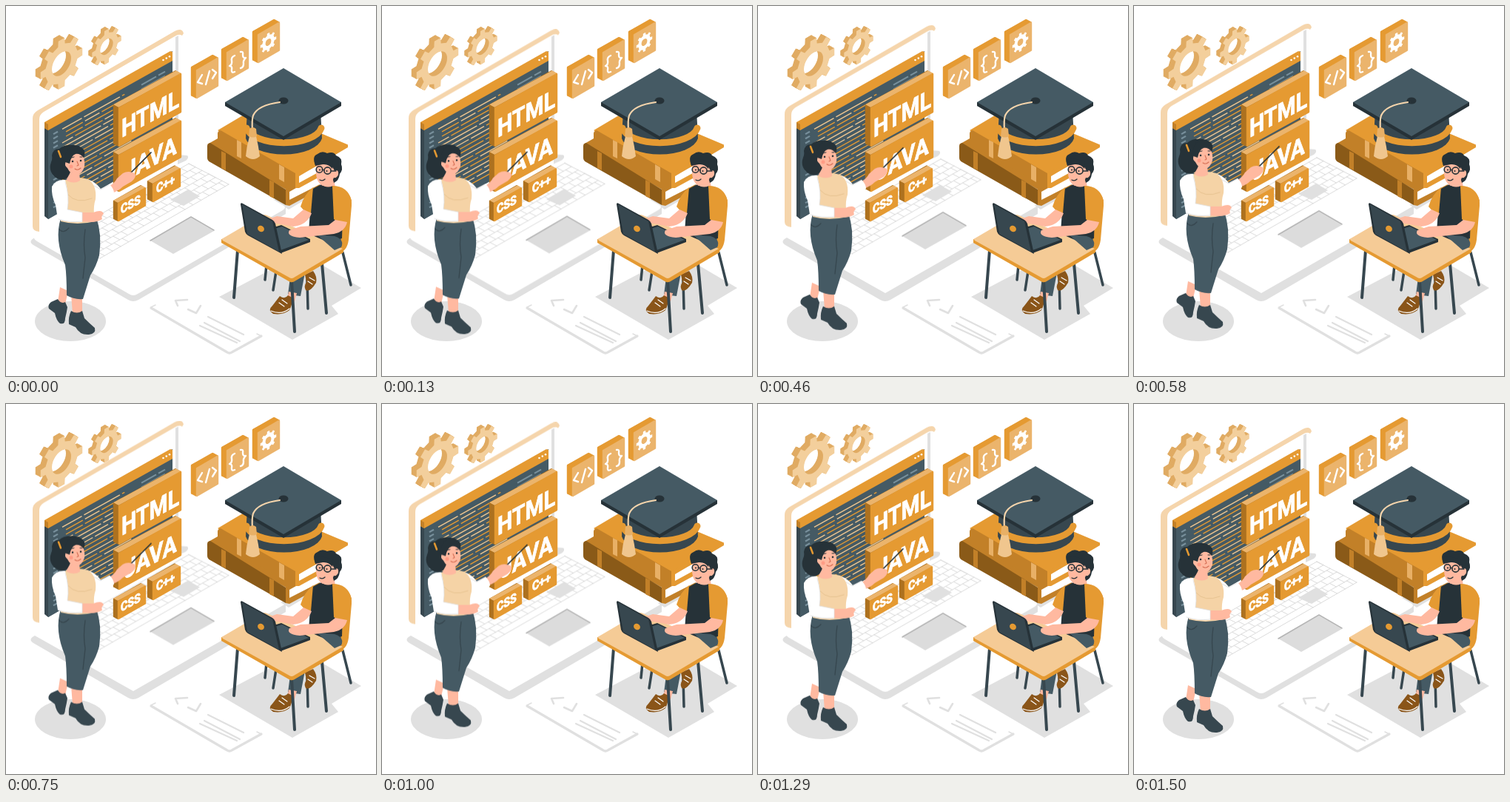
An HTML page that plays this animation: 500x500 px, repeating every 1540 ms.

```html
<!DOCTYPE html>
<html lang="en">
<head>
<meta charset="utf-8">
<title>Learning to code</title>
<style>
  html, body { margin: 0; width: 100%; height: 100%; overflow: hidden; background: #fff; }
  svg { display: block; width: 100%; height: 100%; }
  .float { animation: float 770ms cubic-bezier(.37, 0, .63, 1) infinite alternate; }
  @keyframes float { to { transform: translateY(-9.5px); } }
  text {
    font-family: Roboto, "Open Sans", sans-serif; font-weight: 700;
    fill: #fff; stroke: #fff; stroke-width: .9; stroke-linejoin: round;
  }
  .line { fill: none; stroke-linecap: round; stroke-linejoin: round; }
  .grey { fill: #e0e0e0; }
  .slate { fill: #455a64; }
  .dark { fill: #37474f; }
  .ink { fill: #263238; }
  .amber { fill: #e59a32; }
  .tan { fill: #c28028; }
  .brown { fill: #8a5a18; }
  .peach { fill: #f5d5ac; }
  .skin { fill: #ffb9a0; }
  .white { fill: #fff; }
</style>
</head>
<body>
<svg viewBox="0 0 500 500">
  <!-- floor shadows -->
  <path class="grey" d="M39 313Q29 318 37 323L165 397Q172 401 179 397L378 281V270L172 388Z"/>
  <ellipse class="grey" cx="87" cy="426" rx="48" ry="27"/>
  <path class="grey" d="M288 393L387 451L449 416L440 405L480 381L400 334Z"/>
  <path class="grey" d="M362 262L382 275L424 250L400 240Z"/>

  <!-- sheet of paper -->
  <g class="line" stroke="#e0e0e0">
    <path d="M196 408L299 468Q302 470 305 468L345 446" stroke-width="3.200"/>
    <path d="M196 407L202 404M339 443L345 446" stroke-width="1.500"/>
    <path d="M245 397L229 398L232 405M246 410L257 415L263 405" stroke-width="2.600"/>
    <path d="M273 420L321 444M268 428L316 453M262 432L312 455" stroke-width="2.200"/>
  </g>

  <!-- big laptop -->
  <g class="float">
    <path class="white" d="M42 309Q34 313 42 318L166 389Q172 393 178 389L374 276Q380 272 374 269L242 195Z"/>
    <path class="white" d="M40 302V150L234 36V202L70 306Z"/>
    <path class="grey" d="M229 42L233 40V205L229 206Z"/>
    <path class="grey" d="M232 201L245 202Q248 205 243 209L232 214Z"/>
    <path class="peach" d="M36 298V152Q36 145 43 141L228 34Q238 29 240 37L238 40Q234 37 228 41L51 143Q45 147 45 153V305Q36 304 36 298Z"/>
    <path class="line" id="keys" transform="matrix(1.74 -1 .54 .28 73 313)" stroke="#dcdcdc" stroke-width="1" vector-effect="non-scaling-stroke"/>
    <path class="grey" d="M222 262L246 248L262 257L240 270Z"/>
    <path fill="#dcdcdc" d="M195 317L250 286L281 304L226 335Z"/>
    <path class="line" d="M195 317L250 285L281 303" stroke="#b5b5b5" stroke-width="1.500"/>
  </g>

  <!-- code window -->
  <path class="dark" d="M52 158L225 61V191L57 288L52 284Z"/>
  <path class="slate" d="M57 161L225 66V191L57 288Z"/>
  <path class="amber" d="M52 157L222 61L225 62V74L57 168L52 165Z"/>
  <path class="tan" d="M52 157L57 160V168L52 165Z"/>
  <g class="white">
    <circle cx="212.500" cy="73" r="1.300"/><circle cx="216.800" cy="70.600" r="1.300"/><circle cx="221" cy="68.200" r="1.300"/>
  </g>
  <g id="code"></g>
  <g id="panels"></g>

  <g>
    <text transform="matrix(.84 -.455 0 1 156 178)" font-size="34">HTML</text>
    <text transform="matrix(.84 -.455 0 1 160 237)" font-size="34">JAVA</text>
    <text transform="matrix(.84 -.455 0 1 155 281)" font-size="17">CSS</text>
    <text transform="matrix(.84 -.455 0 1 203 253)" font-size="17">C++</text>
  </g>
  <g class="line" stroke="#fff" stroke-width="2.400">
    <path d="M265 93L259 103L265 105M270 106L275 88M279 86L284 90L279 98"/>
    <path d="M309 67Q304 69 305 74Q306 79 302 81Q306 81 305 86Q304 91 309 89M317 62Q321 61 320 66Q320 71 324 70Q320 74 321 78Q321 83 317 84"/>
  </g>
  <g id="gears"></g>

  <!-- books -->
  <path class="tan" d="M272 187L330 154L424 218L380 249Z"/>
  <path class="brown" d="M276 185Q271 186 272 192V205Q272 209 276 211L378 269V248Z"/>
  <path class="white" d="M381 249L424 228V246L384 264Z"/>
  <path class="tan" d="M378 248L424 222V228L383 251V262L424 241V248L383 270L378 269Z"/>
  <path class="amber" d="M286 168L340 136L461 187L462 190L391 230Z"/>
  <path class="tan" d="M290 168Q285 169 286 175V184Q286 188 290 190L391 246V226Z"/>
  <path class="white" d="M394 230L446 202V219L396 242Z"/>
  <path class="amber" d="M391 226L462 187V191L396 230V239L440 215V222L396 246L391 246Z"/>
  <g fill="#e8b066">
    <path d="M312 181L318 184V206L312 203ZM369 214L376 218V238L369 234Z"/>
    <path fill="#c28028" d="M291 196L297 199V222L291 219ZM356 235L362 238V260L356 257Z"/>
  </g>

  <!-- graduation cap -->
  <path class="dark" d="M326 140L324 179A52 25 0 0 0 427 179L425 140Z"/>
  <path class="line" d="M325 165A51 23 0 0 0 426 165" stroke="#e59a32" stroke-width="9" stroke-linecap="butt"/>
  <path class="ink" d="M296 130V135L375 181L453 135V130Z"/>
  <path class="slate" d="M296 130L375 84L453 130L375 176Z"/>
  <ellipse class="ink" cx="375" cy="128" rx="6.500" ry="4.500"/>
  <path class="line" d="M370 130Q340 134 334 148Q332 154 333 168" stroke="#f5d5ac" stroke-width="2.200"/>
  <path fill="#f0c68e" d="M329 176Q325 190 324 203Q334 211 343 203Q341 188 338 176Z"/>
  <path fill="#e8b066" d="M329 166Q333 162 338 166L339 176Q334 179 328 176Z"/>

  <!-- chair and lower body -->
  <g class="line" stroke="#37474f" stroke-width="3.500">
    <path d="M455 333L466 377M366 352L361 384M407 370L408 409M353 340L350 370"/>
  </g>
  <path class="amber" d="M452 248Q468 252 467 270L463 316Q461 331 450 334L426 340L436 312Z"/>
  <path class="slate" d="M416 306L452 312Q456 326 440 330L406 350L398 392L381 390L386 350Z"/>
  <path class="skin" d="M382 386L393 388L390 399L380 396Z"/>
  <path d="M370 392Q377 397 381 391L387 394Q387 404 383 411Q375 418 361 416Q353 411 360 405Z" fill="#8a5519"/>
  <path d="M404 363L415 358Q421 366 419 374Q411 387 405 384Q402 379 406 373Z" fill="#8a5519"/>
  <path class="line" d="M358 412Q372 418 383 409M369 401L376 406M373 397L380 402M410 367L417 371M408 372L414 376" stroke="#fff" stroke-width="1.200"/>

  <!-- man -->
  <path class="skin" d="M426 232L443 230L445 246Q433 253 425 245Z"/>
  <path class="ink" d="M413 248L426 241Q433 247 442 243L456 252L454 314Q430 322 409 306Z"/>
  <path class="amber" d="M415 245Q403 254 398 271Q404 279 412 280Z"/>
  <path class="amber" d="M441 243Q462 243 467 263L462 292Q450 294 443 288Z"/>
  <path class="ink" d="M418 215Q413 203 421 200Q427 195 434 199Q443 196 446 202Q455 205 453 214Q456 221 451 227Q450 236 443 239L436 214Z"/>
  <path class="skin" d="M419 213L439 215Q443 220 444 223Q450 220 449 228Q447 233 443 232Q440 243 428 243Q420 239 419 227Z"/>
  <path class="ink" d="M418 216Q415 205 426 206L442 210L441 220Q436 213 428 214Z"/>
  <g class="line" stroke="#263238" stroke-width="1.600">
    <circle cx="423.500" cy="221" r="4.300"/><circle cx="434.500" cy="222.500" r="4.600"/>
    <path d="M427 221L430 222M439 223L446 223M424 235Q428 237 431 234" stroke-width="1.300"/>
  </g>
  <circle class="ink" cx="424" cy="221.500" r="1.100"/><circle class="ink" cx="433.500" cy="223" r="1.100"/>

  <!-- desk -->
  <g class="line" stroke="#37474f" stroke-width="4">
    <path d="M313 330L308 394M386 372L390 440M427 348L433 415"/>
  </g>
  <path class="amber" d="M291 315V320L384 373Q387 374 390 372L456 333V328Z"/>
  <path fill="#f5cb96" d="M293 314L346 283Q349 281 353 283L455 328L389 367Q386 369 383 367L293 317Q290 315 293 314Z"/>
  <path class="slate" d="M420 309L444 311Q458 316 453 326L444 330Z"/>

  <!-- small laptop and hands -->
  <path class="ink" d="M371 334L411 319V315L372 296L355 301Z"/>
  <path class="slate" d="M371 330L409 316L373 298L360 302Z"/>
  <path class="skin" d="M402 275L413 280Q407 296 388 298L367 294Q352 293 357 287L366 284L388 287Z"/>
  <path class="skin" d="M445 289L461 292Q458 305 443 308L397 313Q378 311 383 303L398 298L436 296Z"/>
  <path class="ink" d="M317 268Q317 265 320 267L360 289Q363 291 364 294L373 335L327 310Q324 308 323 305Z"/>
  <path class="dark" d="M319 268L360 291L369 332L326 308Z"/>
  <ellipse class="amber" cx="344.500" cy="301" rx="4.600" ry="4" transform="rotate(35 344.500 301)"/>

  <!-- woman -->
  <g class="float">
    <path class="skin" d="M73 380L84 385L80 403L70 400ZM88 390L103 394L103 416L90 416Z"/>
    <path class="dark" d="M70 396Q74 403 80 400L83 407Q82 414 80 422Q80 431 73 429Q68 425 66 415L58 409Q56 404 61 400Z"/>
    <path class="dark" d="M88 412Q96 417 103 412L106 422Q113 429 120 435Q122 443 112 444Q100 445 94 434L85 430Q84 420 88 412Z"/>
    <path class="slate" d="M74 287L122 286Q130 308 126 337Q122 352 114 364L104 396Q92 397 82 391Q82 364 80 350Q65 315 74 287Z"/>
    <path class="line" d="M107 302Q104 322 107 340L104 368M72 302Q78 308 85 300" stroke="#37474f" stroke-width="1.300"/>

    <path class="line" d="M168 226L196 198" stroke="#263238" stroke-width="1.700"/>
    <path class="skin" d="M139 244Q147 239 150 233L158 226Q165 222 174 226Q177 231 170 237L158 244Q152 250 143 253Z"/>
    <path class="white" d="M108 234Q120 236 128 247L140 241Q146 247 146 253Q134 264 125 266Q114 262 108 250Z"/>
    <path class="line" d="M119 243L128 248L139 242" stroke="#e0e0e0" stroke-width="1"/>
    <path d="M78 236Q94 229 111 234Q123 242 121 261Q118 270 119 282L121 291Q96 297 74 291Q79 272 74 256Z" fill="#f5d3a6"/>
    <path class="line" d="M84 255Q95 268 116 260" stroke="#e8c492" stroke-width="1"/>
    <path class="skin" d="M84 221L99 224L100 236Q92 241 82 236Z"/>
    <path class="skin" d="M101 279L118 279Q130 274 132 281Q128 284 130 288Q122 294 101 291Z"/>
    <path class="white" d="M80 235Q67 234 62 244Q61 256 67 269L70 288Q80 293 103 292V279L83 275Q86 258 80 235Z"/>
    <path class="line" d="M80 238Q86 258 83 275L103 279V291Q84 293 71 288" stroke="#e0e0e0" stroke-width=".8"/>

    <path class="ink" d="M99 189Q80 185 72 193Q63 193 62 202Q63 207 61 211Q57 222 65 230Q74 238 83 232Q91 220 89 206Z"/>
    <path class="skin" d="M86 202Q93 196 103 199Q107 209 106 217Q103 227 96 228Q87 228 83 219Q78 215 81 210Q84 208 86 211Z"/>
    <path class="ink" d="M80 202Q84 188 97 189Q110 193 105 205Q100 199 94 200Q88 202 86 213L80 211Z"/>
    <path class="line" d="M71 196L74 204" stroke="#e59a32" stroke-width="2.500"/>
    <circle class="ink" cx="90" cy="210" r="1.300"/><circle class="ink" cx="101" cy="209" r="1.300"/>
    <path class="line" d="M88 205L92 204M100 204L103 204" stroke="#263238" stroke-width="1"/>
    <path class="line" d="M96 210L98 215L96 216M93 220Q97 223 101 219" stroke="#d66f55" stroke-width="1.100"/>
    <circle cx="88" cy="217" r="2.500" fill="#ff9c85"/>
  </g>
</svg>
<script>
const byId = id => document.getElementById(id);
const shape = (d, fill, extra = '') => `<path d="${d}" fill="${fill}" ${extra}/>`;
const AMBER = '#e59a32', PALE = '#ebb46c', SIDE = '#ad711f', SLOPE = .54;

// upright slab, (x, y) is the top left corner of its front face
function slab(x, y, w, h, depth = 7, front = AMBER, side = SIDE, top = PALE) {
  const rise = w * SLOPE, back = depth * .55;
  const round = c => `stroke="${c}" stroke-width="2.400" stroke-linejoin="round"`;
  const box = (l, t) => `M${l + 1} ${t + 1}l${w - 2} ${-rise}v${h - 2}l${2 - w} ${rise}z`;
  return shape(box(x - depth, y - back), side, round(side)) +
    shape(`M${x - depth} ${y - back}l${w} ${-rise}l${depth} ${back}l${-w} ${rise}z`, top) +
    shape(`M${x - depth} ${y - back}l${depth} ${back}v${h}l${-depth} ${-back}z`, side) +
    shape(box(x, y), front, round(front));
}

const tile = (x, y) => slab(x, y, 30, 39, 7, PALE, AMBER, AMBER);

function gearPath(r, hole, teeth = 8) {
  const points = [];
  for (let i = 0; i < teeth; i++) {
    for (const [turn, size] of [[-.27, .77], [-.19, 1], [.19, 1], [.27, .77]]) {
      const a = (i + turn) / teeth * Math.PI * 2;
      points.push(`${(Math.cos(a) * r * size).toFixed(2)} ${(Math.sin(a) * r * size).toFixed(2)}`);
    }
  }
  return `M${points.join('L')}ZM${-hole} 0a${hole} ${hole} 0 1 0 ${2 * hole} 0a${hole} ${hole} 0 1 0 ${-2 * hole} 0Z`;
}

function gear(x, y, r, hole, depth, front, side) {
  let out = '';
  for (let k = depth; k >= 0; k -= .5) {
    const place = `matrix(.866 -.5 0 1 ${x - k} ${y - k * .55})`;
    out += shape(gearPath(r, hole), k ? side : front, `fill-rule="evenodd" transform="${place}"`);
  }
  return out;
}

// rows of staggered keys on a 100 by 100 board
function keyGrid() {
  const rows = 6, step = 100 / rows, keyWidth = 6.25;
  let d = '';
  for (let r = 0; r <= rows; r++) {
    d += `M0 ${r * step}H100`;
    if (r === rows) break;
    for (let x = r % 3 * 1.8; x <= 100; x += keyWidth) {
      if (r < rows - 1 || x < 25 || x > 62) d += `M${x} ${r * step}v${step}`;
    }
    d += `M0 ${r * step}v${step}M100 ${r * step}v${step}`;
  }
  return d;
}

function codeLines() {
  let seed = 11, out = '';
  const random = () => (seed = seed * 16807 % 2147483647) / 2147483647;
  const stroke = (x, end, drop, color, width) => {
    const y = at => (168 - SLOPE * 1.035 * (at - 57) + drop).toFixed(1);
    out += `<path d="M${x} ${y(x)}L${end} ${y(end)}" stroke="${color}" stroke-width="${width}"/>`;
  };
  for (let i = 0; i < 17; i++) {
    const drop = 9 + i * 6.2;
    stroke(64, 70, drop, '#78909c', 2.2);
    let x = 76 + Math.floor(random() * 3) * 5;
    const end = 150 + random() * 23;
    while (x < end) {
      const next = Math.min(end, x + 14 + random() * 40);
      stroke(x, next, drop, random() < .45 ? '#f0c68e' : AMBER, 1.4);
      x = next + 3;
    }
  }
  for (const [a, b, drop] of [[183, 203, 9], [206, 215, 9], [183, 215, 15], [183, 208, 21],
    [183, 207, 83], [210, 215, 83], [183, 213, 89]]) stroke(a, b, drop, '#78909c', 2);
  return out;
}

byId('keys').setAttribute('d', keyGrid());
byId('code').innerHTML = codeLines();
byId('panels').innerHTML =
  slab(152, 137, 85, 53) + slab(152, 201, 85, 50) +
  slab(198, 240, 38, 25) + slab(151, 266, 38, 25, 6) +
  tile(257, 86) + tile(298, 62) + tile(340, 38);
byId('gears').innerHTML =
  gear(75, 78, 33, 15, 7, '#f3cf9c', '#e0ab63') +
  gear(136, 55, 23, 10, 5, '#f3cf9c', '#e0ab63') +
  gear(354.500, 49, 12.500, 4.500, 0, '#fff', '#fff');
</script>
</body>
</html>
```
